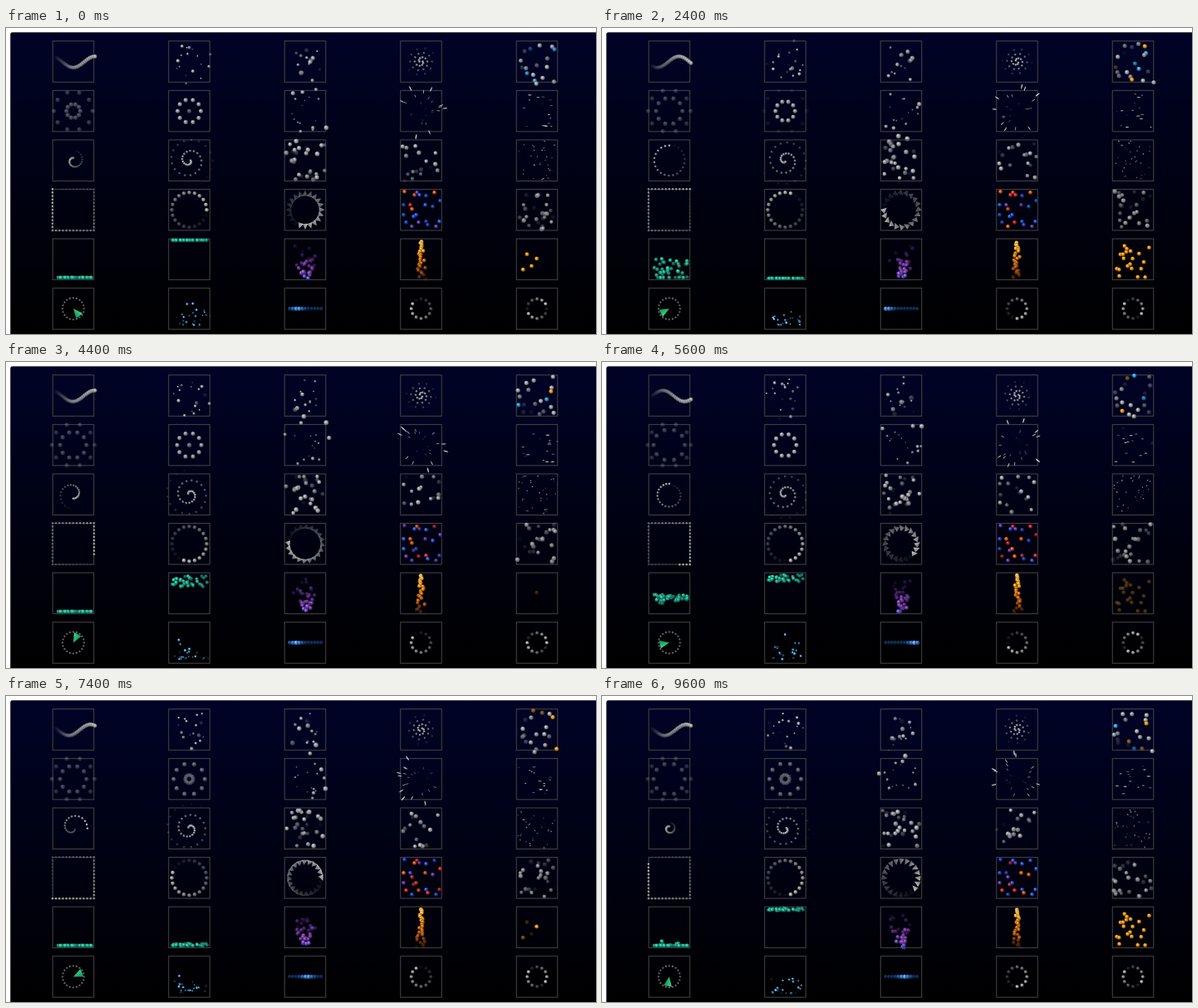
An HTML page with a canvas that plays this animation: 710x369 px, repeating every 9800 ms.

```html
<!DOCTYPE html>
<html lang="en">
<head>
<meta charset="utf-8">
<title>Particle gallery</title>
<style>
html, body { margin: 0; width: 100%; height: 100%; overflow: hidden; background: #fff; }
canvas { display: block; }
</style>
</head>
<body>
<canvas id="stage" width="710" height="369"></canvas>
<script>
const g = document.getElementById('stage').getContext('2d');
const TAU = Math.PI * 2, LOOP = 9.8, STEP = 0.2;
const { sin, cos, abs, floor, min, max, PI } = Math;
let t = 0; // seconds within the loop

const fract = x => x - floor(x);
const rnd = seed => fract(sin(seed * 127.1 + 11.7) * 43758.5453);
const clamp = x => min(1, max(0, x));
const mix = (a, b, k) => a + (b - a) * k;
const deg = d => d * PI / 180;

const GRAY = [0, 0, 66], TEAL = [166, 72, 47], VIOLET = [268, 52, 47],
      ORANGE = [36, 95, 53], BLUE = [200, 85, 55], ICE = [203, 85, 66];
const css = ([h, s, l], shift) => `hsl(${h} ${s}% ${l + shift}%)`;

function ball(x, y, d, a = 1, color = GRAY) {
  if (a <= 0.02) return;
  const r = d / 2, shade = g.createRadialGradient(x - r * .3, y - r * .4, 0, x, y, r);
  shade.addColorStop(0, css(color, 22));
  shade.addColorStop(.5, css(color, 0));
  shade.addColorStop(1, css(color, -30));
  g.globalAlpha = min(1, a);
  g.fillStyle = shade;
  g.beginPath();
  g.arc(x, y, r, 0, TAU);
  g.fill();
}

function streak(x, y, length, width, angle, a) {
  g.globalAlpha = a;
  g.fillStyle = '#ddd';
  g.beginPath();
  g.ellipse(x, y, length / 2, width / 2, angle, 0, TAU);
  g.fill();
}

function triangle(x, y, angle, points, fill, a) {
  g.save();
  g.translate(x, y);
  g.rotate(angle);
  g.globalAlpha = a;
  g.fillStyle = fill;
  g.beginPath();
  points.forEach(p => g.lineTo(...p));
  g.fill();
  g.restore();
}

// Recycled particles: draw(u, R, i) gets the life fraction and a per-life random source.
function swarm(seed, n, life, draw) {
  for (let i = 0; i < n; i++) {
    const age = t / life + i / n + rnd(seed + i) / n, turn = floor(age);
    draw(age - turn, k => rnd(seed * 7.3 + i * 3.17 + turn * 19.1 + k * 5.71), i);
  }
}

const twinkle = (seed, n, size, life, drift = 0, alpha = 1) => () => swarm(seed, n, life, (u, R) =>
  ball(mix(-23, 23, R(1)) + drift * (R(3) - .5) * u, mix(-23, 23, R(2)) + drift * (R(4) - .5) * u,
    size * mix(.85, 1.1, R(5)), sin(PI * u) * alpha));

function ring(r, d, a) {
  for (let i = 0; i < 10; i++) ball(r * cos(i * TAU / 10), r * sin(i * TAU / 10), d, a);
}

const ripples = () => {
  const u = fract(.35 + t) / 2;
  for (const age of [u + .5, u]) ring(26 * (1 - (1 - age) ** 2), 5.4, .48 - age * .25);
};

const converge = () => {
  const u = fract(1 - .9 * t);
  for (const r of [14 * u + 14, 14 * u]) ring(r, 5.2, 1 - abs(r - 13) / 14);
};

const spinner = (n, r, d, start, speed, heads = 1) => () => {
  for (let i = 0; i < n; i++) {
    const angle = i / n * TAU, back = fract(((start + speed * t) / 360 - i / n) * heads);
    ball(r * cos(angle), r * sin(angle), d, 1.05 - back);
  }
};

// Smooth value through the given [time, value] stops.
function through(stops, time) {
  const i = max(1, stops.findIndex(s => s[0] >= time)), [t0, a] = stops[i - 1], [t1, b] = stops[i];
  return mix(a, b, (1 - cos(PI * clamp((time - t0) / (t1 - t0)))) / 2);
}

const wave = () => {
  for (let i = 23; i >= 0; i--) {
    const x = 26 - i * 2.05;
    ball(x, .5 - 6.7 * cos(TAU * (x - 26 + 71 * t) / 52), 5, 1.05 - i / 23);
  }
};

const bubbles = () => swarm(21, 18, 2.4, (u, R) => {
  const a = R(1) * TAU, r = 5 + 16 * R(2) + 8 * u;
  ball(r * cos(a), r * sin(a), 2 + 3.6 * R(3) * (.5 + u / 2), sin(PI * u) * 1.1);
});

const spray = () => swarm(45, 16, 2, (u, R) =>
  ball(mix(-16, 16, R(1)) + 14 * (R(2) - .5) * u, mix(-18, 20, R(3)) + 24 * (R(4) - .4) * u,
    2 + 4.2 * R(5), sin(PI * u)));

const galaxy = () => {
  for (let arm = 0; arm < 2; arm++)
    for (let i = 0; i < 15; i++) {
      const a = i * TAU / 10 + arm * PI + t * 1.6, r = 2 + i * 1.12;
      ball(r * cos(a), r * sin(a), 2.8, 1.05 - i / 15);
    }
};

const mixedSpots = [-18, 4, -20, 9, -16, 10, -5, 13, 2, 5, -4, -20, 4, -22, -10, -16, 18, -12, 17, -20,
  14, -5, 16, 11, 22, 23, -4, 21, -15, 17, 10, 6, 0, 24, -12, -10, 9, 20, -20, -4];
const mixed = () => {
  for (let i = 0; i < 20; i++) {
    const phase = t / 2.6 + rnd(i + 3), kind = rnd(i * 2.3 + floor(phase) * 7.7);
    const color = kind > .82 ? ORANGE : kind > .67 ? BLUE : GRAY;
    ball(mixedSpots[2 * i] + 3 * sin(t + i), mixedSpots[2 * i + 1] + 3 * cos(t * .8 + i * 2),
      5.4, 1.1 * sin(PI * fract(phase)), color);
  }
};

const starfield = () => swarm(83, 17, 2, (u, R) => {
  const a = R(1) * TAU, r = 6 + 12 * R(2) + 20 * u * u;
  ball(r * cos(a), r * sin(a), 1.6 + 4.6 * u * u, .5 + u * .5);
});

const burst = () => swarm(9, 24, 1.2, (u, R) => {
  const a = R(1) * TAU, r = 6 + 26 * u;
  streak(r * cos(a), r * sin(a), 2 + 4.5 * u, .5 + .9 * u, a, clamp(.2 + u * .8));
});

const dashes = () => swarm(31, 17, 1.8, (u, R) =>
  streak(mix(-20, 20, R(1)) + 12 * (u - .5), mix(-21, 21, R(2)), 2 + 3 * R(3), 1.1, 0, sin(PI * u) * .9));

const radiusStops = [[-.8, 12], [0, 3], [.6, 8], [1.4, 19], [2.4, 18], [3.6, 17], [4.4, 5],
  [5.2, 15], [5.8, 12], [6.6, 2], [7.4, 17], [8.2, 17.5], [8.8, 7], [9.8, 2]];
const orbit = () => {
  for (let i = 0; i < 22; i++) {
    const time = t - i * .036, a = deg(270 + 450 * time), r = through(radiusStops, time);
    ball(r * cos(a), r * sin(a), 2.8, 1.05 - i / 22);
  }
};

const spiral = () => {
  for (let i = 0; i < 40; i++) {
    const a = i * .37 - t * 2, r = 1.5 + i * .78;
    ball(r * cos(a), r * sin(a), 3, 1.1 - i / 35);
  }
};

const perimeter = () => {
  for (let i = 0; i < 48; i++) {
    const p = i / 12, side = floor(p), k = (p - side) * 50 - 25;
    const [x, y] = [[k, -25], [25, k], [-k, 25], [-25, -k]][side];
    ball(x, y, 2.8, 1.02 - fract(.1 * t + .01 - i / 48));
  }
};

const cones = () => {
  for (let i = 0; i < 20; i++) {
    const a = i / 20 * TAU, back = fract((120 + 180 * t) / 360 - i / 20);
    const shade = g.createLinearGradient(0, -3.5, 0, 3.5);
    shade.addColorStop(0, '#ddd');
    shade.addColorStop(1, '#777');
    triangle(20 * cos(a), 20 * sin(a), a + t, [[-3.3, -3.3], [3.7, 0], [-3.3, 3.3]], shade, 1 - back * .95);
  }
};

const confettiSpots = [-20, -22, -8, -18, -5, -21, -2, -18, 6, -17, 16, -21, 23, -11, -21, -6, -11, -1, -13, -6,
  5, -6, 14, -4, -9, 8, -6, 6, -21, 6, -18, 15, -11, 20, 6, 14, 8, 18, 22, 14, 18, 20, -3, 15];
const confettiColors = [[226, 80, 52], [222, 80, 50], [264, 55, 46], [20, 88, 50], [355, 75, 50]];
const confetti = () => {
  for (let i = 0; i < 22; i++) {
    const phase = t / 3 + rnd(i + 50), k = floor(rnd(i * 3.1 + floor(phase)) * 5);
    ball(confettiSpots[2 * i], confettiSpots[2 * i + 1], 5, .65 + .4 * sin(PI * fract(phase)), confettiColors[k]);
  }
};

const rain = () => {
  const age = fract((t - .9) / 3.7) * 3.7;
  for (let i = 0; i < 40; i++) {
    const fall = age - .1 * rnd(i + 9), ease = (fall * .82) ** 2, hop = max(0, fall - 1.2);
    const bounce = max(0, 52 * rnd(i + 70) * abs(sin(hop * 3.6)) * (1 - hop / 1.15) - 8);
    const y = fall < 1.2 ? mix(-18, 22, ease) + 9 * (rnd(i + 31) - .5) : 22 - bounce;
    ball(mix(-22, 22, rnd(i + 5)), min(22, y), 5, .45 + .55 * rnd(i + 17), TEAL);
  }
};

const liftStops = [[-1, 1], [0, 1], [1.4, .42], [2.4, 0], [4.4, .8], [5.2, 1], [6.6, .4], [7.6, 0], [8.2, .1], [9.8, 1]];
const lift = () => {
  const h = through(liftStops, t), spread = 1.9 * h * (1 - h);
  for (let i = 0; i < 40; i++) {
    const k = clamp(h + spread * (rnd(i + 12) - .5));
    ball(mix(-22, 22, rnd(i + 40)), mix(23, -23, k), 4.6, .45 + .55 * rnd(i + 8), TEAL);
  }
};

const smoke = () => swarm(61, 32, 1.6, (u, R) =>
  ball((R(1) - .5) * (7 + 26 * u), 22 - 40 * u * (.55 + R(2) * .5) + 8 * (R(3) - .5),
    5, 1.1 - u, [mix(238, 275, clamp(u * 4)), 55, mix(58, 45, u)]));

const flame = () => swarm(71, 28, 1.3, (u, R) =>
  ball((R(1) - .5) * (2 + 12 * u), -22 + 48 * u, 4.9, 1.2 * (1 - u * u),
    [mix(42, 26, clamp(u * 1.5)), 92, mix(68, 47, clamp(u * 2.5))]));

const sparks = () => {
  const age = fract((t - 2) / 3.6) * 3.6;
  for (let i = 0; i < 20; i++) {
    const life = .8 + 1.8 * rnd(i + 90) ** 5;
    ball(mix(-23, 20, rnd(i + 33)), mix(-20, 22, rnd(i + 14)), 5, clamp((life - age) * 4) * clamp(age * 5 + .3), ORANGE);
  }
};

const radar = () => {
  for (let i = 0; i < 20; i++) ball(13 * cos(i * TAU / 20), 13 * sin(i * TAU / 20), 2.6, .55);
  const shade = g.createLinearGradient(0, -5, 0, 5);
  shade.addColorStop(0, '#3ddc97');
  shade.addColorStop(1, '#118a4c');
  triangle(0, 0, deg(50 - 107.3 * t), [[0, 0], [11.5, -5], [11.5, 5]], shade, 1);
};

const splash = () => swarm(101, 24, 1.9, (u, R) => {
  const y = 20 - 34 * R(2) * abs(sin(PI * (u * 1.7 + R(4)))) * (1 - u * .6);
  ball(mix(-16, 20, R(1)) + 14 * (R(3) - .5) * u, y, 1.6 + 1.8 * R(5), 1.1 - u, ICE);
});

const scanner = () => {
  const head = abs(fract((1.75 + .92 * t) / 2) * 2 - 1);
  for (let i = 0; i < 11; i++) {
    const glow = clamp(1 - abs(i / 10 - (1 - head)) * 3.2);
    ball(-18.5 + i * 3.8, 0, 5.5, .5 + glow * .5, [213, 75, 32 + 32 * glow]);
  }
};

const cells = [
  wave, bubbles, spray, galaxy, mixed,
  ripples, converge, starfield, burst, dashes,
  orbit, spiral, twinkle(13, 28, 5.4, 2.2, 4, 1.1), twinkle(27, 17, 5.2, 2.4, 4), twinkle(39, 36, 1.9, 2, 2, .75),
  perimeter, spinner(20, 21, 4.8, 15, 270), cones, confetti, twinkle(57, 25, 5.3, 2.6, 3, .85),
  rain, lift, smoke, flame, sparks,
  radar, splash, scanner, spinner(12, 11.8, 4.2, 215, 250), spinner(12, 11.8, 4.2, 160, 250, 2)
];

const sky = g.createLinearGradient(0, 5, 0, 369);
sky.addColorStop(0, '#000326');
sky.addColorStop(1, '#000');

function drawStage() {
  g.globalAlpha = 1;
  g.fillStyle = '#fff';
  g.fillRect(0, 0, 710, 369);
  g.beginPath();
  g.roundRect(5.5, 5.5, 710, 370, 2);
  g.fillStyle = sky;
  g.fill();
  g.strokeStyle = '#000';
  g.lineWidth = .5;
  g.stroke();
}

function draw() {
  drawStage();
  cells.forEach((cell, i) => {
    g.save();
    g.translate(81 + i % 5 * 139.5, 40.5 + floor(i / 5) * 59.6);
    g.globalAlpha = 1;
    g.strokeStyle = '#464646';
    g.lineWidth = 1;
    g.strokeRect(-24.75, -24.75, 49.5, 49.5);
    cell();
    g.restore();
  });
}

function tick() {
  const seconds = performance.now() / 1000 % LOOP;
  t = floor(seconds / STEP + 1e-6) * STEP;
  draw();
  requestAnimationFrame(tick);
}
tick();
</script>
</body>
</html>
```
